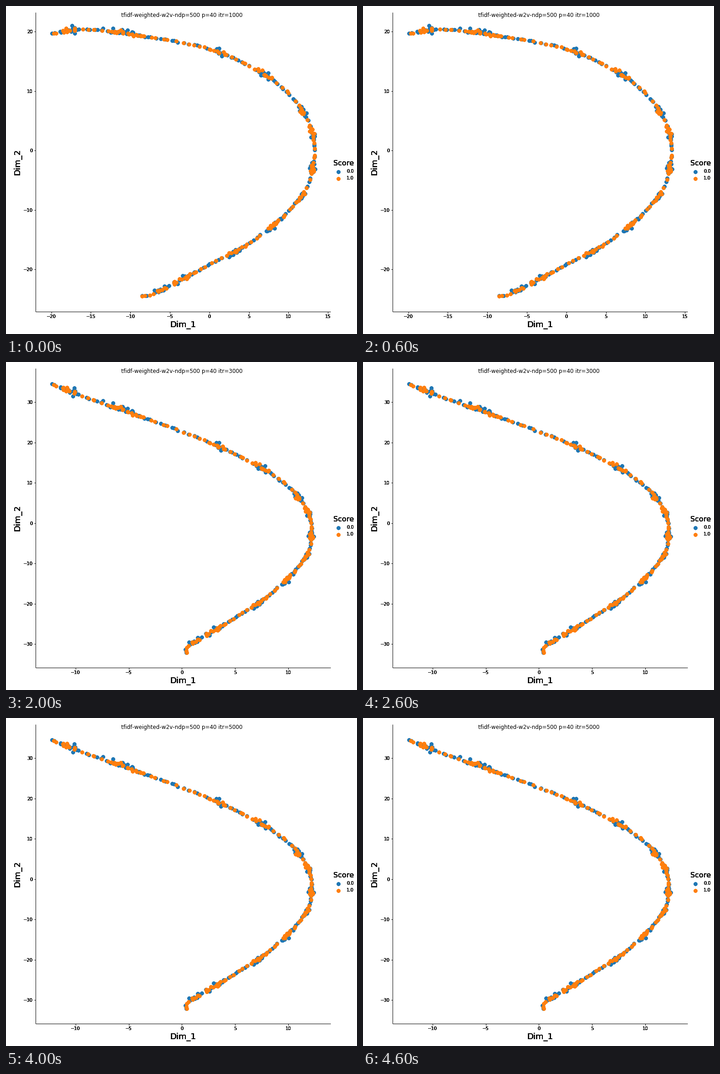
Animation of 771x720 px, one loop 5 s. Source, as a matplotlib script:

```python
import numpy as np
import matplotlib.pyplot as plt
from matplotlib.animation import FuncAnimation

W, H, DPI = 771, 720, 72
BLUE, ORANGE = "#1f77b4", "#ff7f0e"
LEFT, RIGHT, TOP, BOTTOM = 65, 713, 14, 671

plt.rcParams["font.family"] = "DejaVu Sans"
plt.rcParams["text.kerning_factor"] = 6  # whole-pixel letter spacing

# Key points of the embedding curve at each stage, in stage pixels.
EARLY = [(97, 61), (176, 51), (296, 65), (431, 90), (530, 129), (621, 192),
         (671, 272), (674, 355), (640, 428), (548, 511), (441, 571),
         (327, 630), (299, 636)]
MIDDLE = [(97, 47), (171, 77), (289, 115), (424, 159), (524, 202), (613, 257),
          (666, 318), (671, 377), (647, 431), (571, 502), (475, 562),
          (380, 626), (356, 637)]
SETTLED = [(97, 47), (175, 77), (295, 119), (431, 170), (525, 213), (613, 267),
           (661, 325), (671, 381), (654, 433), (588, 503), (503, 562),
           (404, 621), (396, 638)]

# Each stage: curve, then (zero, pixels per unit, tick values) for x and y.
STAGES = [
    (EARLY, (446.8, 17.36, range(-20, 16, 5)), (317.2, 13.05, range(-20, 21, 10))),
    (MIDDLE, (410.6, 20.64, range(-15, 11, 5)), (350.3, 9.56, range(-30, 31, 10))),
    (SETTLED, (386.4, 23.37, range(-10, 11, 5)), (353.8, 8.855, range(-30, 31, 10)))]

# Where points bunch up, counted in key points along the curve.
CLUMPS = [0.5, 1.6, 1.85, 3.35, 4.4, 5.45, 6.1, 7, 7.85, 8.6, 9.4, 10.35, 10.85]


def sample(start, fill, per_clump, spread, seed):
    """Even fill plus clumps: positions along the curve, offsets across it."""
    rng = np.random.default_rng(seed)
    chords = np.hypot(*np.diff(EARLY, axis=0).T)
    length = np.append(0, np.cumsum(chords))
    s = np.linspace(start, 1, fill) + rng.uniform(-0.5, 0.5, fill) / fill
    along = np.interp(s * length[-1], length, range(len(length)))
    bunch = np.repeat(CLUMPS, per_clump)
    along = np.append(along, bunch + rng.normal(0, 0.1, bunch.size))
    across = np.append(rng.normal(0, 0.7, fill),
                       rng.normal(0, spread, bunch.size))
    return along, across


def spline(knots, u):
    """Catmull-Rom curve through the knots."""
    k = np.array(knots, float)
    k = np.vstack([2 * k[0] - k[1], k, 2 * k[-1] - k[-2]])
    i = np.clip(u.astype(int), 0, len(knots) - 2)
    t = (u - i)[:, None]
    a, b, c, d = k[i], k[i + 1], k[i + 2], k[i + 3]
    return b + t / 2 * (c - a + t * (2 * a - 5 * b + 4 * c - d
                                     + t * (3 * (b - c) + d - a)))


def place(knots, along, across):
    u = np.clip(along, 0, len(knots) - 1)
    tan = spline(knots, u + 0.01) - spline(knots, u - 0.01)
    tan /= np.hypot(*tan.T)[:, None]
    normal = np.column_stack([-tan[:, 1], tan[:, 0]])
    return spline(knots, u) + across[:, None] * normal


LAYERS = [(BLUE, sample(0, 125, 9, 3.2, 4)),
          (ORANGE, sample(0.003, 95, 7, 2.3, 9))]

fig = plt.figure(figsize=(W / DPI, H / DPI), dpi=DPI, facecolor="white")
ax = fig.add_axes([0, 0, 1, 1])


# Overprinting gives text and dots hard, saturated edges.
def heavy(x, y, s, size, **kw):
    for _ in range(5):
        ax.text(x, y, s, fontsize=size, va="baseline", **kw)


def dots(xy, color):
    x, y = np.repeat(xy, 4, axis=0).T
    ax.scatter(x, y, s=68, color=color, lw=0)


def line(x0, y0, x1, y1):
    ax.plot([x0, x1], [y0, y1], color="black", lw=1, solid_capstyle="butt")


def label(v):
    return str(v).replace("-", "\u2212")


def draw_axes(xaxis, yaxis):
    line(LEFT, TOP, LEFT, BOTTOM)
    line(LEFT, BOTTOM, RIGHT, BOTTOM)
    zero, scale, ticks = xaxis
    for v in ticks:
        x = zero + v * scale
        line(x, BOTTOM, x, BOTTOM + 3.5)
        heavy(x, 685, label(v), 10, ha="center")
    zero, scale, ticks = yaxis
    for v in ticks:
        y = zero - v * scale
        line(LEFT - 3.5, y, LEFT, y)
        heavy(58.5, y + 4, label(v), 10, ha="right")
    heavy(389, 705, "Dim_1", 18, ha="center")
    heavy(30, (TOP + BOTTOM) / 2, "Dim_2", 18, ha="center", rotation=90,
          rotation_mode="anchor")


def draw_legend():
    heavy(718.5, 350, "Score", 16)
    for y, name, color in [(363.5, "0.0", BLUE), (378.5, "1.0", ORANGE)]:
        dots([(729.5, y)], color)
        heavy(748, y + 2.5, name, 10)


def update(i):
    ax.clear()
    ax.set(xlim=(0, W), ylim=(H, 0))
    ax.axis("off")
    knots, xaxis, yaxis = STAGES[min(i, 2)]
    draw_axes(xaxis, yaxis)
    draw_legend()
    for color, (along, across) in LAYERS:
        dots(place(knots, along, across), color)
    ax.text(253, 24, f"tfidf-weighted-w2v-ndp=500 p=40 itr={1000 * (i + 1)}",
            fontsize=12, va="baseline")
    return []


anim = FuncAnimation(fig, update, frames=5, interval=1000, repeat=True,
                     init_func=lambda: update(0))
plt.show()
```
